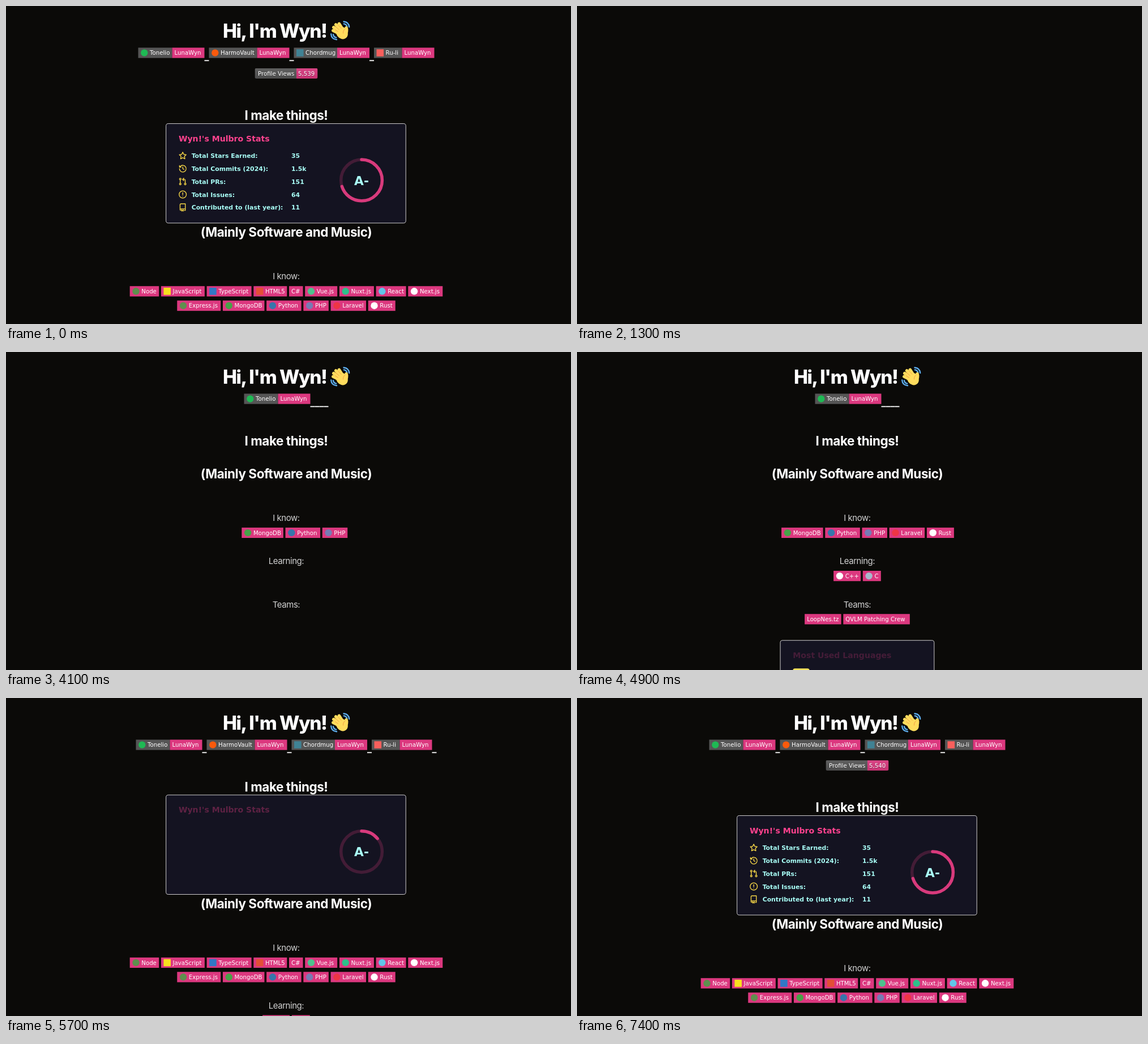
Write an HTML page that moves like this. It is 998 px wide and 561 px high and loops after 8000 ms.

```html
<!DOCTYPE html>
<html lang="en">
<head>
<meta charset="utf-8">
<title>Profile page loading</title>
<style>
  html, body { margin: 0; width: 100%; height: 100%; overflow: hidden; background: #0b0a08; }
  svg { display: block; width: 100vw; height: 100vh; }
  text { white-space: pre; }
  .h1, .h2, .label { font-family: Inter, sans-serif; fill: #fff; }
  .h1 { font-size: 33.5px; font-weight: 800; letter-spacing: -.045em; }
  .h2 { font-size: 22.5px; font-weight: 700; letter-spacing: -.02em; text-anchor: middle; }
  .label { font-size: 15px; letter-spacing: -.03em; text-anchor: middle; fill: #d2d2d2; }
  .badge { font: 10.2px "DejaVu Sans", sans-serif; fill: #fff; }
  .title, .stat, .rank { font-family: "DejaVu Sans", sans-serif; font-weight: 700; }
  .title { font-size: 15.5px; fill: #fe428e; }
  .stat { font-size: 12px; fill: #a9fef7; }
  .rank { font-size: 24px; fill: #a9fef7; text-anchor: middle; }
  .card { fill: #141321; stroke: #e4e2e2; }
  .icon { fill: none; stroke: #f8d847; stroke-width: 1.5; stroke-linecap: round; stroke-linejoin: round; }
</style>
</head>
<body>
<svg id="stage" viewBox="0 0 998 561"></svg>
<script>
const LOOP = 8000, STEP = 100, CENTER = 495, PINK = '#dc387f', GREY = '#555';
const CARD_SCALE = .909, GAP = 3.7, DASH = 8;

// When each part of the page appears, in ms
const AT = {
  cover: 500, blank: 1300, page: 1400, firstService: 3000, someTech: 4100, moreTech: 4400,
  teams: 4500, languages: 4650, services: 5000, allTech: 5200, stats: 5390, views: 6000
};

// Services: name, label width, icon colour, icon shape
const services = [
  ['Tonelio', 60, '#1fb954'],
  ['HarmoVault', 85, '#f95a0c'],
  ['Chordmug', 76.5, '#408294', 'square'],
  ['Ru-li', 49.5, '#f85f5c', 'square']
];
// Badges: name, width, icon colour, icon shape
const tech = [
  ['Node', 51.5, '#5f8f4e'], ['JavaScript', 77, '#f7df1e', 'square'],
  ['TypeScript', 79, '#3178c6', 'square'], ['HTML5', 59, '#e34f36', 'square'],
  ['C#', 24.5], ['Vue.js', 57, '#4fc08d'], ['Nuxt.js', 61, '#2ec08a'],
  ['React', 53, '#61c5e8'], ['Next.js', 61, '#fff'],
  ['Express.js', 77, '#5f8f4e'], ['MongoDB', 73.5, '#47a248'], ['Python', 61.5, '#3776ab'],
  ['PHP', 44.5, '#777bb4'], ['Laravel', 62.5, '#ee3545'], ['Rust', 48, '#fff']
];
const learning = [['C++', 48, '#fff'], ['C', 32, '#a8b9cc']];
const teams = [['LoopNes.tz', 64.5], ['QVLM Patching Crew', 117.5]];

const stats = [
  ['Total Stars Earned:', '35', '<path d="M8 1l2 4.2 4.7.7-3.4 3.3.8 4.7L8 11.6l-4.1 2.3.8-4.7L1.3 5.9 6 5.2Z"/>'],
  ['Total Commits (2024):', '1.5k', '<path d="M1.6 8A6.5 6.5 0 1 0 3.2 3.7M1.7 2v3h3M8 4.5V8l2.3 1.3"/>'],
  ['Total PRs:', '151', '<path d="M3.2 5v6M12.8 11V5.2Q12.8 3.8 11.3 3.8H8M10 1.5L7.7 3.8 10 6.1"/>' +
    [[3.2, 3.2], [3.2, 12.8], [12.8, 12.8]].map(([x, y]) => `<circle cx="${x}" cy="${y}" r="1.6"/>`).join('')],
  ['Total Issues:', '64', '<circle cx="8" cy="8" r="7"/><path d="M8 4.5v4M8 11.2v.1"/>'],
  ['Contributed to (last year):', '11',
    '<path d="M13 11V1.2H4.5Q2.8 1.2 2.8 3v9.5Q2.8 14 4.5 14M2.8 12.5Q3 11 4.5 11H13v3h-2M6 12v3.3l1.5-1.1L9 15.3V12"/>']
];

const clamp = v => Math.min(1, Math.max(0, v));
const sum = values => values.reduce((a, b) => a + b, 0);

// cubic-bezier(.42, 0, .58, 1)
function easeInOut(p) {
  p = clamp(p);
  let low = 0, high = 1;
  for (let i = 0; i < 20; i++) {
    const u = (low + high) / 2, v = 1 - u;
    if (1.26 * u * v * v + 1.74 * u * u * v + u ** 3 < p) low = u; else high = u;
  }
  return 3 * low ** 2 - 2 * low ** 3;
}

const rect = (x, y, w, h, fill, extra = '') =>
  `<rect x="${x}" y="${y}" width="${w}" height="${h}" fill="${fill}" ${extra}/>`;
const text = (cls, x, y, str, extra = '') => `<text class="${cls}" x="${x}" y="${y}" ${extra}>${str}</text>`;
const group = (transform, body) => `<g transform="${transform}">${body}</g>`;

function badge(x, y, [name, width, color, shape], fill = PINK) {
  const icon = !color ? '' : shape === 'square'
    ? rect(x + 4.5, y + 2.8, 12.6, 12.6, color)
    : `<circle cx="${x + 10.8}" cy="${y + 9.1}" r="6.2" fill="${color}"/>`;
  return rect(x, y, width, 18.2, fill) + icon + text('badge', x + (color ? 20.6 : 4), y + 12.8, name);
}

// Badges still loading take no width but keep their gaps
function badgeRow(list, y, loaded = () => true) {
  const width = (b, i) => loaded(i) ? b[1] : 0;
  let x = CENTER - (sum(list.map(width)) + GAP * (list.length - 1)) / 2;
  return list.map((b, i) => {
    const part = loaded(i) ? badge(x, y, b) : '';
    x += width(b, i) + GAP;
    return part;
  }).join('');
}

function serviceRow(count, wraps) {
  const y = 73.5, valueWidth = 57, dashes = wraps ? 3 : 4;
  let x = CENTER - (sum(services.slice(0, count).map(s => s[1] + valueWidth)) + DASH * dashes) / 2;
  return services.map((s, i) => {
    let part = '';
    if (i < count) {
      part += badge(x, y, s, GREY) + badge(x + s[1], y, ['LunaWyn', valueWidth]);
      x += s[1] + valueWidth;
    }
    if (i < dashes) {
      part += rect(x, 95.4, DASH, 1.8, '#fff');
      x += DASH;
    }
    return part;
  }).join('');
}

function viewsBadge(count) {
  const x = 439.5, y = 109.8;
  return `<clipPath id="round">${rect(x, y, 111, 18.2, '#000', 'rx="2.7"')}</clipPath>
    <linearGradient id="shine" x2="0" y2="1">
      <stop stop-color="#bbb" stop-opacity=".1"/><stop offset="1" stop-opacity=".1"/>
    </linearGradient>
    <g clip-path="url(#round)">${rect(x, y, 73.5, 18.2, GREY)}${rect(x + 73.5, y, 37.5, 18.2, PINK)}
    ${rect(x, y, 111, 18.2, 'url(#shine)')}</g>` +
    [[445, 'Profile Views'], [516, count]].map(([tx, str]) =>
      text('badge', tx, y + 13.7, str, 'style="fill:#010101" opacity=".3"') + text('badge', tx, y + 12.8, str)).join('');
}

function card(x, y, width, height, title, age, body) {
  return group(`translate(${x} ${y}) scale(${CARD_SCALE})`,
    `<rect class="card" x=".5" y=".5" width="${width}" height="${height}" rx="4.5"/>` +
    text('title', 25, 35, title, `opacity="${easeInOut(age / 800)}"`) + body);
}

function statsCard(y, age) {
  const r = 40, length = 2 * Math.PI * r, filled = .7 * length * easeInOut(age / 1000);
  const rows = stats.map(([name, value, icon], i) =>
    `<g opacity="${easeInOut((age - 450 - 150 * i) / 300)}" transform="translate(25 ${55 + 25 * i})">
      <g class="icon">${icon}</g>${text('stat', 25, 12.5, name)}${text('stat', 219, 12.5, value)}</g>`).join('');
  const ring = `<g fill="none" stroke="#fe428e" stroke-width="6" transform="rotate(-90)">
      <circle r="${r}" opacity=".2"/>
      <circle r="${r}" opacity=".8" stroke-linecap="round" stroke-dasharray="${filled} ${length}"/></g>` +
    group(`scale(${easeInOut(age / 300)})`, text('rank', 0, 9, 'A-'));
  return card(282.2, y, 466, 193, "Wyn!'s Mulbro Stats", age, rows + group('translate(380.5 110.5)', ring));
}

function languagesCard(y, age) {
  const bar = rect(25, 55, 250 * easeInOut(age / 1000), 8, '#f1e05a', 'rx="4"');
  return card(358.6, y, 299, 284, 'Most Used Languages', age, bar);
}

function wavingHand() {
  const fingers = 'M19 25L5 18M20 22L6 12M22 19L10 7.2M24 18L16 5.5';
  return group('translate(573 26) scale(.96)', `<g fill="none" stroke-linecap="round">
    <path stroke="#5dadec" stroke-width="2.5" d="M24.5 1.5Q34 2.5 34.6 11.5M24.8 5.6Q29.6 6.4 30.6 11M1.3 24.5Q1.8 34 11.5 34.6M5.2 25.2Q6 30.1 10.8 30.8"/>
    <path stroke="#ffdc5d" stroke-width="5.6" d="${fingers}M27 26Q31.5 19 29.3 13"/>
    <ellipse cx="21.3" cy="22.3" rx="10.3" ry="12" transform="rotate(-35 21.3 22.3)" fill="#ffdc5d"/>
    <path stroke="#ef9645" stroke-width=".9" d="M8.5 16.4L14 20M9.3 10.6L16 16.5M14.5 8.2L20 14M27 15Q23 18 23.5 23"/></g>`);
}

function cursor(x, y) {
  return group(`translate(${x} ${y})`,
    '<path d="M.5 .5V15.5L4 12.3 6.5 18 9 17 6.6 11.5H10.7Z" fill="#000" stroke="#fff"/>');
}

function page(t, views) {
  const hasViews = t >= AT.views, hasStats = t >= AT.stats, allTech = t >= AT.allTech;
  const top = hasViews ? 36.4 : 0;
  const middle = top + (hasStats ? 148 : 0);
  const lower = middle + (allTech ? 25.5 : 0);
  const count = t >= AT.services ? 4 : t >= AT.firstService ? 1 : 0;
  const techLoaded = i => i >= 10 && t >= (i < 13 ? AT.someTech : AT.moreTech);

  let out = text('h1', 383, 55.7, "Hi, I'm Wyn!") + wavingHand() + serviceRow(count, hasViews);
  if (hasViews) out += viewsBadge(views);
  out += text('h2', CENTER, 164.6 + top, 'I make things!');
  if (hasStats) out += statsCard(170.6 + top, t - AT.stats);
  out += text('h2', CENTER, 223 + middle, '(Mainly Software and Music)');
  out += text('label', CENTER, 298 + middle, 'I know:');
  out += allTech
    ? badgeRow(tech.slice(0, 9), 309.8 + middle) + badgeRow(tech.slice(9), 335.2 + middle)
    : badgeRow(tech, 309.8 + middle, techLoaded);
  out += text('label', CENTER, 374.4 + lower, 'Learning:') + text('label', CENTER, 450.8 + lower, 'Teams:');
  if (t >= AT.teams) out += badgeRow(learning, 386 + lower) + badgeRow(teams, 462.2 + lower);
  if (t >= AT.languages) out += languagesCard(508.3 + lower, t - AT.languages);
  if (t === 7200) out += cursor(12, 18);
  if (t === 7300) out += cursor(6, 11);
  return out;
}

function scene(t) {
  const covered = t >= AT.cover && t < AT.blank;
  const background = rect(0, 0, 998, 561, covered ? '#1c1b22' : '#0b0a08');
  if (t < AT.cover) return background + page(LOOP, '5,539');
  return background + (t >= AT.page ? page(t, '5,540') : '');
}

const stage = document.getElementById('stage');
let shown = -1;
function draw(now) {
  const t = Math.floor(now % LOOP / STEP) * STEP;
  if (t !== shown) stage.innerHTML = scene(shown = t);
  requestAnimationFrame(draw);
}
draw(0);
</script>
</body>
</html>
```
